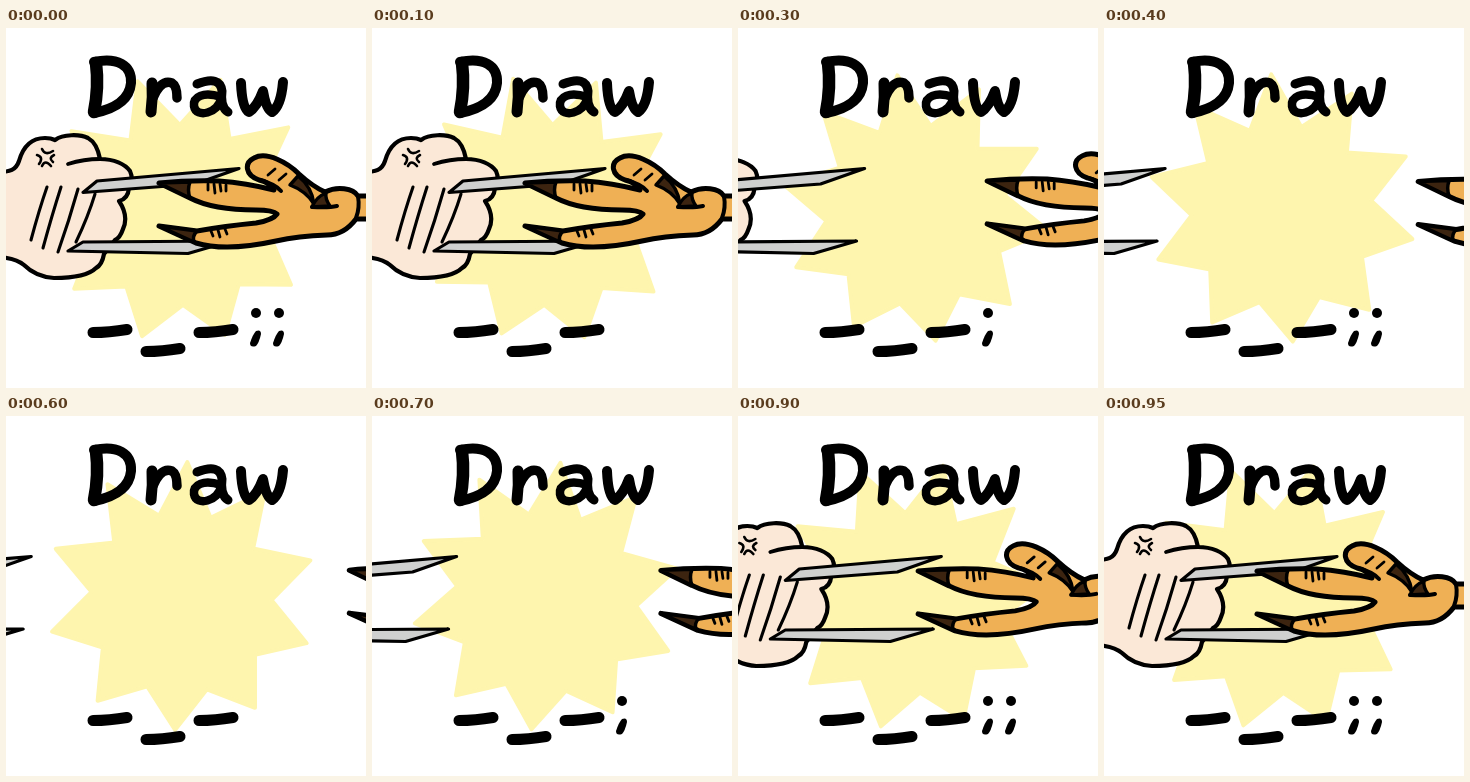
An HTML page with a canvas that plays this animation: 360x360 px, repeating every 1000 ms.

```html
<!DOCTYPE html>
<html lang="en">
<head>
<meta charset="utf-8">
<title>Draw</title>
<style>
html, body { margin: 0; width: 100%; height: 100%; overflow: hidden; background: #fff; }
canvas { display: block; width: 100vw; height: 100vh; }
</style>
</head>
<body>
<canvas id="stage" width="360" height="360" role="img" aria-label="Draw"></canvas>
<script>
const ctx = document.getElementById('stage').getContext('2d');
const LOOP = 1000, STEP = 50;
const INK = '#000', SKIN = '#fbe8d7', STEEL = '#cfd0cf', CLAW = '#efb055', NAIL = '#3c2410', BURST = '#fef5ae';

ctx.lineJoin = ctx.lineCap = 'round';

const clamp = (v, lo, hi) => Math.max(lo, Math.min(hi, v));

function shape(d, fill, width) {
  const path = new Path2D(d);
  if (fill) {
    ctx.fillStyle = fill;
    ctx.fill(path);
  }
  if (width) {
    ctx.strokeStyle = INK;
    ctx.lineWidth = width;
    ctx.stroke(path);
  }
}

function line(d, width) {
  shape(d, null, width);
}

function at(x, y, draw) {
  ctx.save();
  ctx.translate(x, y);
  draw();
  ctx.restore();
}

// Ten-pointed burst, turning by one point per loop
function burst(t) {
  const cx = 176 + 2.5 * Math.sin((t - 50) / LOOP * 2 * Math.PI), cy = 180;
  const turn = (t / LOOP * 36 - 109) * Math.PI / 180;
  ctx.beginPath();
  for (let i = 0; i < 20; i++) {
    const a = turn + i * Math.PI / 10;
    const r = i % 2 ? 90 + 7 * Math.sin(a) : 134;
    ctx.lineTo(cx + r * Math.cos(a), cy + r * Math.sin(a));
  }
  ctx.closePath();
  ctx.fillStyle = ctx.strokeStyle = BURST;
  ctx.lineWidth = 4;
  ctx.fill();
  ctx.stroke();
}

function fist() {
  shape('M-8 144C4 144 10 142 13 133C17 119 25 110 39 110' +
    'Q45 110 49 112C57 106 74 106 82 110Q91 115 94 131' +
    'C108 131 119 136 124 143Q128 152 123 160Q122 171 113 173' +
    'Q123 188 117 201Q114 210 109 212L98 226Q96 237 90 240' +
    'C82 248 66 250 48 250C33 249 25 244 18 237Q10 230 -8 229Z', SKIN, 4.2);
  line('M62 136Q78 131 94 131', 3.8);
  line('M41 159Q33 182 25 212M55 159Q46 187 37 220M72 161Q63 193 52 224M89 166Q82 189 70 214', 3.1);
  line('M36 121Q39 128 47 123M31 127Q38 129 33 136M36 138Q39 131 45 138M48 127Q42 130 47 134', 2.6);
  shape('M77 164.5L91 153L233 140.5L189 156Z', STEEL, 3.2);
  shape('M62 223L77 214L225 213L182 225.5Z', STEEL, 3.2);
}

function claw() {
  shape('M153 155Q183 152 213 153Q240 155 268 162' +
    'Q263 154 253 152C239 147 238 135 248 130C261 123 282 135 293 146' +
    'Q306 158 319 164C331 158 347 160 352 168L368 168V191L350 191' +
    'Q338 207 321 207Q292 208 270 213Q220 224 190 215L153 198' +
    'L191 203Q219 198 250 195Q267 192 271 186Q267 182 250 182' +
    'Q207 182 184 170Z', CLAW, 5);
  shape('M153 155L184 154Q181 162 184 170Z', NAIL, 3.5);
  shape('M153 198L191 203Q186 208 188 214Z', NAIL, 3.5);
  line('M254 152Q269 156 275 163', 4);
  shape('M284 157L292 148Q306 159 308 176Q300 163 284 157Z', NAIL, 3.4);
  shape('M306 179Q310 169 320 165Q319 171 324 178Z', NAIL, 3.4);
  line('M306 179Q323 180 331 178M352 168Q354 180 350 190', 4);
  line('M202 156V162M208 156L209 165M214 156L215 163M220 157V163', 2.8);
  line('M205 203L207 208M212 202L214 209M219 201L221 206', 2.8);
  line('M262 147L269 141M273 152L280 146', 2.8);
}

function title() {
  line('M90 35Q93 59 88 84', 12.5);
  line('M88 34C111 29 126 37 125 55Q123 78 88 85', 10);
  line('M146 55Q147 69 145 84', 11);
  line('M147 70Q155 51 166 55Q171 58 171 70', 9.5);
  line('M191 56Q214 47 216 63Q214 79 222 84', 9);
  line('M215 69C197 63 187 69 188 78C190 91 213 85 215 70', 8.5);
  line('M235 55Q236 80 243 84Q251 79 257 63Q260 81 266 84Q275 78 277 54', 10);
}

function dash(x, y) {
  line(`M${x} ${y}Q${x + 16} ${y} ${x + 34} ${y - 3}`, 11);
}

function semicolon(x) {
  ctx.fillStyle = INK;
  ctx.beginPath();
  ctx.arc(x, 285, 5, 0, 2 * Math.PI);
  ctx.fill();
  shape(`M${x} 303Q${x + 5} 301 ${x + 5} 306Q${x + 3} 315 ${x} 318` +
    `Q${x - 6} 320 ${x - 6} 315Q${x - 3} 306 ${x} 303Z`, INK);
}

function leftX(t) {
  return t <= 550
    ? -clamp((t - 137.5) * 0.655, 0, 237.5)
    : -237.5 * (950 - Math.min(t, 950)) / 400;
}

function right(t) {
  if (t <= 550) {
    const x = clamp((t - 152) * 0.65, 0, 217.5);
    return { x, y: x ? -3 + x / 109 : 0 };
  }
  const k = (950 - Math.min(t, 950)) / 400;
  return { x: 217.5 * k, y: -k };
}

function markCount(t) {
  const p = t % 500;
  if (p < 50 || p >= 350) return 2;
  return p < 200 ? 0 : 1;
}

function render(t) {
  ctx.fillStyle = '#fff';
  ctx.fillRect(0, 0, 360, 360);
  burst(t);
  at(leftX(t), 0, fist);
  const r = right(t);
  at(r.x, r.y, claw);
  title();
  dash(87, 304.5);
  dash(140, 323.5);
  dash(193, 304.5);
  for (let i = 0; i < markCount(t); i++) semicolon(250 + i * 23);
}

const start = performance.now();
function tick() {
  const t = (performance.now() - start) % LOOP;
  render(Math.floor(t / STEP) * STEP);
  requestAnimationFrame(tick);
}
tick();
</script>
</body>
</html>
```
